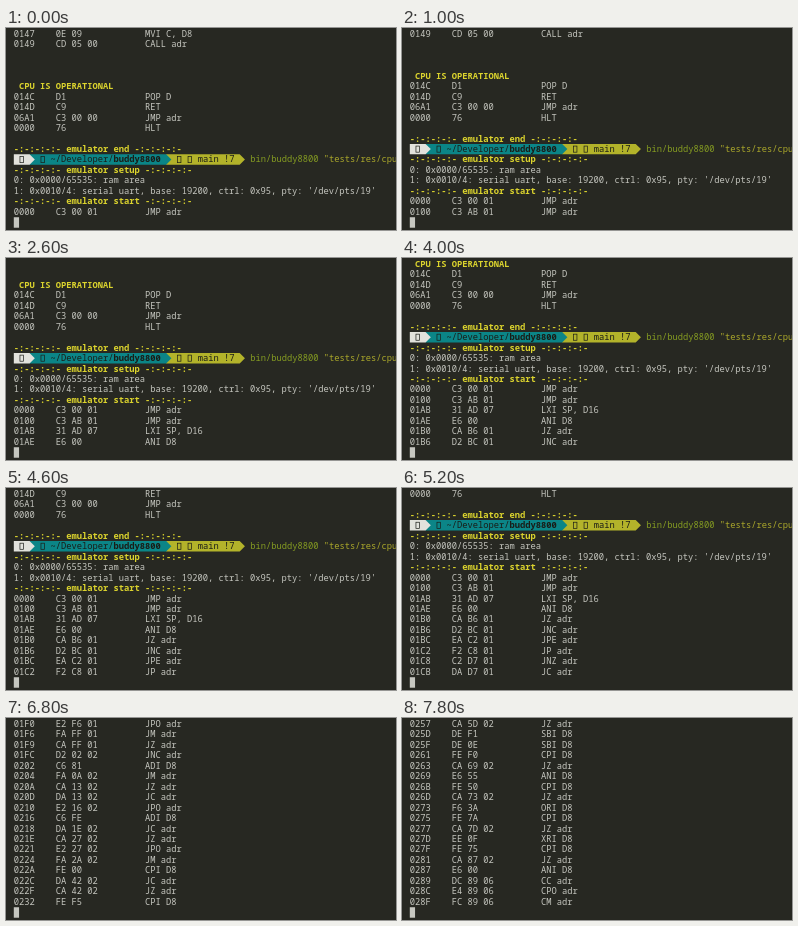
Animation of 390x202 px, one loop 8 s. Source, as an HTML page with a canvas:

```html
<!DOCTYPE html>
<html>
<head>
<meta charset="utf-8">
<style>
html, body { margin: 0; width: 100%; height: 100%; overflow: hidden; background: #272822; }
canvas { display: block; width: 390px; height: 202px; }
</style>
</head>
<body>
<canvas id="screen"></canvas>
<script>
const LEFT = 7.8, CELL_W = 5.253, CELL_H = 10.48, TOP = 0.6, ROWS = 18;
const BACK = '#272822', TEXT = '#c6c7c0', YELLOW = '#dcd42e', INK = '#1a1c17';
const LIGHT = '#e2e2dc', TEAL = '#0b8587', OLIVE = '#b3b32a';
const FONT = `${CELL_W / 0.6}px "Noto Sans Mono", "DejaVu Sans Mono", monospace`;

const canvas = document.getElementById('screen');
const ctx = canvas.getContext('2d');
const ratio = window.devicePixelRatio || 1;
canvas.width = 390 * ratio;
canvas.height = 202 * ratio;

const mnemonics = {
  '0E': 'MVI C, D8', CD: 'CALL adr', D1: 'POP D', C9: 'RET', 76: 'HLT', 31: 'LXI SP, D16',
  C3: 'JMP adr', CA: 'JZ adr', C2: 'JNZ adr', DA: 'JC adr', D2: 'JNC adr',
  EA: 'JPE adr', E2: 'JPO adr', F2: 'JP adr', FA: 'JM adr',
  DC: 'CC adr', E4: 'CPO adr', FC: 'CM adr',
  E6: 'ANI D8', C6: 'ADI D8', FE: 'CPI D8', CE: 'ACI D8', D6: 'SUI D8',
  DE: 'SBI D8', F6: 'ORI D8', EE: 'XRI D8'
};

// Executed instructions: address, then bytes
const trace = `0000 C3 00 01, 0100 C3 AB 01, 01AB 31 AD 07, 01AE E6 00, 01B0 CA B6 01,
01B6 D2 BC 01, 01BC EA C2 01, 01C2 F2 C8 01, 01C8 C2 D7 01, 01CB DA D7 01,
01CE E2 D7 01, 01D1 FA D7 01, 01D4 C3 DA 01, 01DA C6 06, 01DC C2 E2 01,
01E2 DA EB 01, 01E5 E2 EB 01, 01E8 F2 EE 01, 01EE C6 70, 01F0 E2 F6 01,
01F6 FA FF 01, 01F9 CA FF 01, 01FC D2 02 02, 0202 C6 81, 0204 FA 0A 02,
020A CA 13 02, 020D DA 13 02, 0210 E2 16 02, 0216 C6 FE, 0218 DA 1E 02,
021E CA 27 02, 0221 E2 27 02, 0224 FA 2A 02, 022A FE 00, 022C DA 42 02,
022F CA 42 02, 0232 FE F5, 0234 DA 42 02, 0237 C2 42 02, 023A FE FF,
023C CA 42 02, 023F DA 45 02, 0245 CE 0A, 0247 CE 0A, 0249 FE 0B,
024B CA 51 02, 0251 D6 0C, 0253 D6 0F, 0255 FE F0, 0257 CA 5D 02,
025D DE F1, 025F DE 0E, 0261 FE F0, 0263 CA 69 02, 0269 E6 55,
026B FE 50, 026D CA 73 02, 0273 F6 3A, 0275 FE 7A, 0277 CA 7D 02,
027D EE 0F, 027F FE 75, 0281 CA 87 02, 0287 E6 00, 0289 DC 89 06,
028C E4 89 06, 028F FC 89 06`;

const listing = source => source.split(/,\s+/).map(entry => {
  const bytes = entry.slice(5);
  return (entry.slice(0, 4) + '    ' + bytes).padEnd(25) + mnemonics[bytes.slice(0, 2)];
});
const banner = word => `*-:-:-:-:- emulator ${word} -:-:-:-:-`;

// A leading * marks a bold yellow line, PROMPT the shell prompt
const PROMPT = '$';
const lines = [
  ...listing('0147 0E 09, 0149 CD 05 00'), '', '', '',
  '* CPU IS OPERATIONAL',
  ...listing('014C D1, 014D C9, 06A1 C3 00 00, 0000 76'), '',
  banner('end'), PROMPT, banner('setup'),
  '0: 0x0000/65535: ram area',
  "1: 0x0010/4: serial uart, base: 19200, ctrl: 0x95, pty: '/dev/pts/19'",
  banner('start'),
  ...listing(trace)
];

const colX = col => LEFT + col * CELL_W;

function write(text, col, y, color, bold) {
  ctx.font = (bold ? 'bold ' : '') + FONT;
  ctx.fillStyle = color;
  ctx.fillText(text, colX(col), y + 8.1);
}

// Prompt segment whose right end is an arrow one cell wide
function segment(from, to, y, color) {
  const x = colX(to);
  ctx.fillStyle = color;
  ctx.beginPath();
  ctx.moveTo(colX(from), y);
  ctx.lineTo(x, y);
  ctx.lineTo(x + CELL_W, y + CELL_H / 2);
  ctx.lineTo(x, y + CELL_H);
  ctx.lineTo(colX(from), y + CELL_H);
  ctx.fill();
}

function drawPrompt(y) {
  segment(29, 43, y, OLIVE);
  segment(3, 29, y, TEAL);
  segment(0, 3, y, LIGHT);
  ctx.strokeStyle = INK;
  ctx.lineWidth = 0.7;
  for (const col of [1, 5, 31, 33]) ctx.strokeRect(colX(col) + 0.9, y + 2.2, 3.4, 6.1);
  write('~/Developer/', 7, y, INK);
  write('buddy8800', 19, y, INK, true);
  write('main !7', 35, y, INK);
  write('bin/buddy8800', 45, y, '#869d22');
  write('"tests/res/cpu', 59, y, '#aba82b');
}

// Single key presses, then the key is held down
const presses = [1000, 1800, 2600, 3400, 3900, 4300, 4600, 4900, 5150, 5400, 5600, 5800, 6000];
const HOLD = 6000, REPEAT = 33.9;

function scrolled(t) {
  const held = Math.max(0, Math.floor((t - HOLD) / REPEAT));
  return Math.min(lines.length - ROWS, presses.filter(p => p <= t).length + held);
}

function draw(now) {
  const t = Math.floor(now % 8000 / 200) * 200;
  const first = scrolled(t);
  ctx.setTransform(ratio, 0, 0, ratio, 0, 0);
  ctx.fillStyle = BACK;
  ctx.fillRect(0, 0, 390, 202);
  for (let row = 0; row < ROWS; row++) {
    const line = lines[first + row], y = TOP + row * CELL_H;
    if (line === PROMPT) drawPrompt(y);
    else if (line[0] === '*') write(line.slice(1), 0, y, YELLOW, true);
    else write(line, 0, y, TEXT);
  }
  ctx.fillStyle = TEXT;
  ctx.fillRect(LEFT, TOP + ROWS * CELL_H, CELL_W, CELL_H);
}

let start;
function tick(now) {
  start ??= now;
  draw(now - start);
  requestAnimationFrame(tick);
}
draw(0);
requestAnimationFrame(tick);
</script>
</body>
</html>
```
